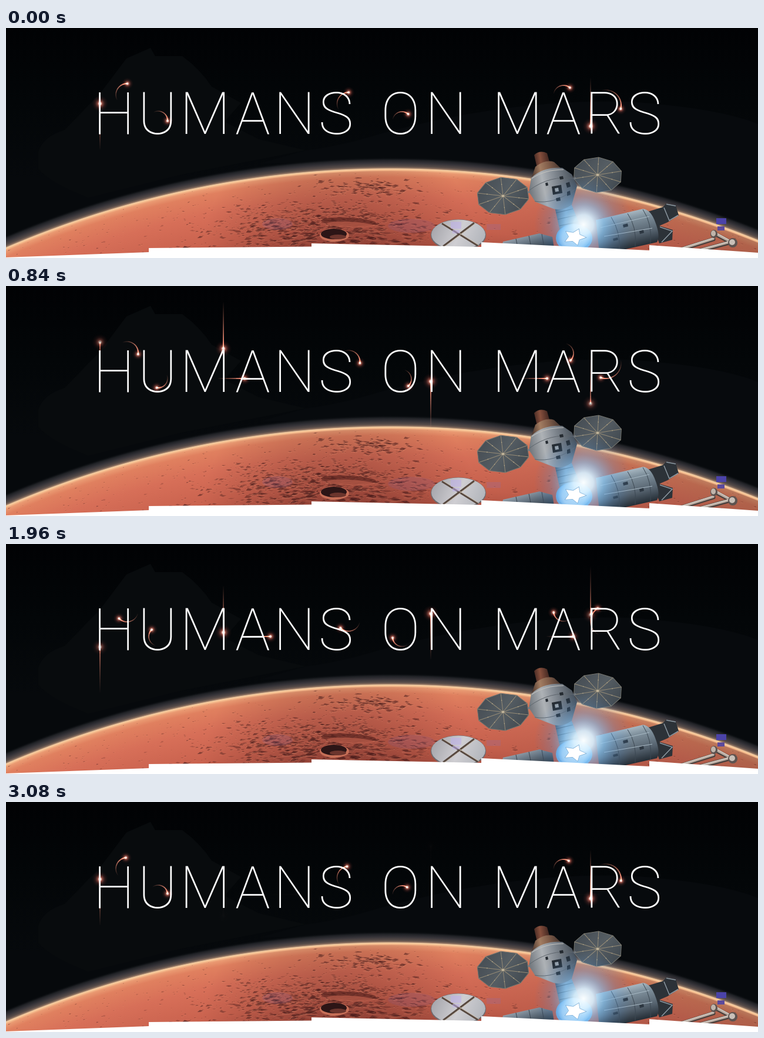
An HTML page with a canvas for the animation above (3150 ms loop, 1280 px wide and 393 px high).

```html
<!DOCTYPE html>
<html lang="en">
<head>
<meta charset="utf-8">
<title>Humans on Mars</title>
<style>
html, body { margin: 0; width: 100%; height: 100%; overflow: hidden; background: #020406; }
canvas { display: block; }
</style>
</head>
<body>
<canvas id="stage" width="1280" height="393"></canvas>
<script>
const W = 1280, H = 393, LOOP = 3150, STEP = 70, TAU = Math.PI * 2;
const ctx = document.getElementById('stage').getContext('2d');
const still = document.createElement('canvas');
still.width = W;
still.height = H;
const bg = still.getContext('2d');

let seed = 11;
const rnd = () => (seed = (seed * 16807) % 2147483647) / 2147483647;
const bell = () => rnd() + rnd() + rnd() + rnd() - 2;

function shade(g, ...stops) {
  stops.forEach(([at, color]) => g.addColorStop(at, color));
  return g;
}
const linear = (x1, y1, x2, y2, ...stops) => shade(bg.createLinearGradient(x1, y1, x2, y2), ...stops);
const radial = (x, y, r1, r2, ...stops) => shade(bg.createRadialGradient(x, y, r1, x, y, r2), ...stops);

function fill(style, d) {
  bg.fillStyle = style;
  bg.fill(new Path2D(d));
}
function line(color, width, d) {
  bg.strokeStyle = color;
  bg.lineWidth = width;
  bg.stroke(new Path2D(d));
}
function oval(style, x, y, rx, ry, turn = 0) {
  bg.fillStyle = style;
  bg.beginPath();
  bg.ellipse(x, y, rx, ry, turn, 0, TAU);
  bg.fill();
}
function wash(style) {
  bg.fillStyle = style;
  bg.fillRect(0, 0, W, H);
}

function drawSky() {
  wash(linear(0, 0, 0, 260, [0, '#010204'], [0.5, '#030608'], [1, '#06090c']));
  fill('#080b0d', 'M55 212Q62 186 100 174L160 112L205 52L246 34L254 48L300 48Q330 70 350 100L400 128L372 160L430 190L510 209L300 250L140 290Q70 262 55 240Z');
  fill('#070a0d', 'M430 232L510 209Q570 202 640 180Q860 120 1060 126Q1210 136 1280 164V345L1000 250L700 225Z');
}

const MARS = { x: 655, y: 1897, r: 1656 };
const limb = x => MARS.y - Math.sqrt(MARS.r ** 2 - (x - MARS.x) ** 2);

// a thin jagged shadow with a lit lower edge
function fleck(x, y, size, alpha) {
  const slope = (x - MARS.x) / MARS.r + bell() * 0.3;
  const flat = size * (0.12 + rnd() * 0.22);
  const d = `M${x - size} ${y - size * slope}L${x - size * rnd() * 0.6} ${y - flat}`
    + `L${x + size * rnd()} ${y - flat * rnd()}L${x + size} ${y + size * slope}L${x} ${y + flat}Z`;
  line(`rgba(255,176,138,${alpha * 0.4})`, 0.8, `M${x - size} ${y + flat + 1}L${x + size} ${y + size * slope + 1}`);
  fill(`rgba(66,24,24,${alpha})`, d);
}

function drawMars() {
  wash(radial(MARS.x, MARS.y, MARS.r - 150, MARS.r + 20,
    [0, '#a34b3c'], [0.3, '#c9624e'], [0.6, '#d76f58'], [0.8, '#e0805f'], [0.855, '#ea9a72'],
    [0.876, '#f8c595'], [0.884, '#f3cda2'], [0.894, '#8f7260'], [0.91, '#5a4e4a'], [0.945, '#363439'],
    [0.975, '#1e2024'], [1, 'rgba(8,11,14,0)']));
  bg.save();
  bg.beginPath();
  bg.arc(MARS.x, MARS.y, MARS.r - 3, 0, TAU);
  bg.clip();
  wash(radial(570, 400, 20, 240, [0, 'rgba(75,25,25,.38)'], [1, 'rgba(75,25,25,0)']));
  wash(linear(760, 0, 1280, 0, [0, 'rgba(60,25,25,0)'], [1, 'rgba(60,25,25,.3)']));
  for (let i = 0; i < 1900; i++) {
    const rough = i < 1050;
    const x = rough ? 535 + bell() * 165 : rnd() * W;
    const y = rough ? 335 + bell() * 36 : limb(x) + rnd() * 140;
    const depth = Math.max(0, Math.min(1, (y - limb(x)) / 130));
    fleck(x, y, 1 + (1 + depth * (rough ? 9 : 4)) * rnd() ** 1.6, 0.2 + rnd() * (rough ? 0.45 : 0.3));
  }
  for (let i = 0; i < 130; i++) fleck(605 + bell() * 80, 273 + bell() * 15, 1 + rnd() * 6, 0.5);
  oval('rgba(80,30,28,.6)', 583, 331, 47, 7, 0.05);
  oval('rgba(178,88,70,.8)', 586, 336, 40, 5, 0.05);
  oval('#c66f57', 559, 354, 25, 11);
  oval('#2c1516', 558, 352, 22, 9);
  oval('#6b352d', 565, 357, 14, 4);
  oval('rgba(125,100,170,.16)', 462, 335, 26, 10);
  oval('rgba(110,85,160,.14)', 690, 338, 40, 12);
  bg.restore();
}

function drawPanel(x, y, rx, ry, turn) {
  const rim = [...Array(10)].map((_, i) => [Math.cos(i * TAU / 10 + 0.3) * rx, Math.sin(i * TAU / 10 + 0.3) * ry]);
  bg.save();
  bg.translate(x, y);
  bg.rotate(turn);
  const edge = 'M' + rim.map(p => p.join(' ')).join('L') + 'Z';
  fill(linear(-rx, -ry, rx, ry, [0, '#424950'], [0.5, '#555d63'], [1, '#3c444b']), edge);
  line('#74756f', 1, edge);
  line('#958b76', 1, rim.map(p => 'M0 0L' + p.join(' ')).join(''));
  for (const [a, b] of rim) oval('#b9ac8c', a * 0.62, b * 0.62, 0.8, 0.8);
  oval('#c0b49a', 0, 0, 2.5, 2);
  bg.restore();
}

function drawShip() {
  // antenna dish
  oval('#6d6b70', 770, 354, 47, 27);
  oval(linear(725, 335, 815, 375, [0, '#a3a3a9'], [0.5, '#cfced2'], [1, '#aeb2b8']), 770, 353, 46, 25.5);
  line('#584940', 3, 'M742 334L803 372M797 333L744 373');
  line('#c5b9a8', 1, 'M744 333L805 371M799 334L746 374');
  fill('rgba(190,175,235,.55)', 'M757 331h18v12h-18zM760 345h12v6h-12z');
  fill('rgba(130,110,190,.2)', 'M818 335h24v10h-24z');

  drawPanel(846, 287, 45, 32, -0.1);
  drawPanel(1007, 251, 42, 30, 0.08);
  line('#777b7e', 3, 'M888 281L900 277M958 262L970 256');

  // lower left module
  fill(linear(880, 350, 890, 382, [0, '#9facb7'], [0.5, '#687683'], [1, '#35404a']), 'M846 365L908 351L930 357L934 382H842Z');
  line('#3a444e', 1, 'M868 360L872 380M890 355L895 380M912 352L917 380');

  // right module
  fill('#2c3238', 'M1092 314L1118 306L1124 300L1140 303L1145 320L1126 332L1112 338L1135 345L1134 362L1112 368Z');
  line('#8d99a2', 1.5, 'M1120 307L1129 329L1144 320M1113 340L1134 347L1116 366M1124 301L1140 304');
  fill(linear(1045, 315, 1060, 378, [0, '#b0c0ca'], [0.25, '#7f909c'], [0.65, '#56636f'], [1, '#222b33']),
    'M1004 328L1084 309Q1098 310 1106 334Q1114 356 1108 366L1028 384H1010Z');
  line('#3c4852', 1, 'M1030 323Q1046 348 1044 379M1058 317Q1074 340 1071 373M1084 310Q1100 334 1097 368');
  line('#a9bac5', 1, 'M1012 341L1095 322M1018 356L1100 342');
  fill('#2d3741', 'M1050 336l8 -2 1 5 -8 2zM1078 347l7 -2 1 5 -7 2zM1033 360l8 -2 1 4 -8 2z');

  // neck
  fill(linear(934, 0, 976, 0, [0, '#465868'], [0.45, '#8ca6bc'], [1, '#4d6276']), 'M934 306L962 300L979 343L944 352Z');
  line('#394a5a', 1.2, 'M936 316L965 309M939 327L970 320M942 338L974 331');

  // capsule
  fill(linear(898, 220, 925, 216, [0, '#442923'], [0.4, '#87503d'], [1, '#3a221e']), 'M899 217Q909 208 921 214L926 232L904 239Z');
  fill(linear(895, 248, 946, 238, [0, '#4e392f'], [0.3, '#a37d62'], [0.6, '#7f5c49'], [1, '#3d302b']), 'M901 237Q919 224 933 229L947 242L894 258Z');
  fill(linear(892, 278, 971, 262, [0, '#73797f'], [0.3, '#aeb2b6'], [0.55, '#858c94'], [1, '#434c55']),
    'M894 256Q914 237 947 239L963 250L972 270L963 302Q948 313 932 309L901 297L890 280Z');
  line('#c3c2be', 1.2, 'M895 257Q917 242 949 242');
  line('#5f666d', 1, 'M891 277Q926 251 968 257M900 296Q932 302 968 276');
  fill('#242a30', 'M929 271l16 -3 2 14 -16 3zM953 265l6 -2 2 8 -6 2zM955 280l5 -2 1 7 -6 2zM942 254l6 -1 1 5 -6 1zM918 265l4 -1 1 5 -4 1zM936 291l7 -2 1 6 -7 1z');
  fill('#9aa3ab', 'M934 274l6 -1 1 6 -6 1z');

  // docking node and flare
  oval('#6faee3', 967, 359, 31, 24);
  oval(radial(967, 357, 4, 28, [0, '#ffffff'], [0.65, '#c4e6ff'], [1, '#6eb4ee']), 967, 357, 28, 22);
  wash(radial(983, 336, 0, 84, [0, 'rgba(250,254,255,1)'], [0.2, 'rgba(215,240,255,.92)'],
    [0.42, 'rgba(130,195,245,.6)'], [0.7, 'rgba(85,150,215,.22)'], [1, 'rgba(60,120,190,0)']));
  let star = '';
  for (let i = 0; i < 10; i++) {
    const a = i * TAU / 10 - 1.2, r = i % 2 ? 10 : 19;
    star += (i ? 'L' : 'M') + (968 + r * Math.cos(a)) + ' ' + (357 + r * 0.75 * Math.sin(a));
  }
  line('#7fb0d8', 1.5, star + 'Z');
  fill('#ffffff', star + 'Z');

  // robot arm
  bg.lineCap = 'round';
  line('#4a403d', 7, 'M1128 385L1204 361M1160 386L1234 366M1205 351L1237 368');
  line('#b9aca2', 4, 'M1128 384L1204 360M1160 385L1234 365M1205 350L1237 367');
  line('#ddd3ca', 1.2, 'M1128 383L1204 359M1160 384L1234 364M1207 349L1238 366');
  bg.lineCap = 'butt';
  oval('#5d5350', 1205, 352, 6, 7);
  oval('#c0b5ab', 1204, 351, 4, 5);
  oval('#5d5350', 1237, 367, 8, 8);
  oval('#c9c0b8', 1236, 366, 5, 5);
  fill('#4b43a8', 'M1209 325h17v10h-17z');
  fill('#5c4a9c', 'M1211 339h12v7h-12z');
}

function drawTitle() {
  const centers = [183.5, 258, 338.5, 420, 490.5, 562, 671.5, 748.5, 870, 949, 1020, 1087];
  bg.font = '100 100px Roboto, sans-serif';
  bg.fillStyle = bg.strokeStyle = '#fff';
  bg.lineJoin = 'round';
  const stem = bg.measureText('I');
  bg.lineWidth = Math.max(0.1, 3.2 - stem.actualBoundingBoxRight - stem.actualBoundingBoxLeft);
  [...'HUMANSONMARS'].forEach((ch, i) => {
    const m = bg.measureText(ch);
    const x = centers[i] - (m.actualBoundingBoxRight - m.actualBoundingBoxLeft) / 2;
    bg.fillText(ch, x, 181);
    bg.strokeText(ch, x, 181);
  });
}

drawSky();
drawMars();
drawShip();
drawTitle();
fill('#fff', 'M0 392L243 383V376L520 373.5V368L809 374V366L1095 380V371L1280 384V393H0Z');

// at(u) gives the head for u = 0 and the end of the tail for u = 1
function comet(at, alpha, size) {
  const parts = 32;
  for (let i = 0; i < parts; i++) {
    const left = 1 - i / parts;
    ctx.strokeStyle = `rgba(250,140,112,${alpha * left ** 0.8})`;
    ctx.lineWidth = 0.8 + 1.4 * left;
    ctx.beginPath();
    ctx.moveTo(...at(i / parts));
    ctx.lineTo(...at((i + 1) / parts));
    ctx.stroke();
  }
  const [x, y] = at(0);
  const glow = shade(ctx.createRadialGradient(x, y, 0, x, y, size),
    [0, '#fff'], [0.14, 'rgba(255,215,200,.95)'], [0.28, 'rgba(225,110,90,.6)'],
    [0.6, 'rgba(130,50,42,.25)'], [1, 'rgba(60,18,15,0)']);
  ctx.globalAlpha = alpha;
  ctx.fillStyle = glow;
  ctx.fillRect(x - size, y - size, size * 2, size * 2);
  ctx.globalAlpha = 1;
}

const TRAVEL = 124, FADE = 700;
// start x, start y, direction x, direction y, tail length, start time
const straight = [
  [160, 198, 0, -1, 78, 1400],
  [370, 74, 0, 1, 79, 0],
  [723, 196, 0, -1, 78, 0],
  [995, 99, 0, 1, 82, 1400],
  [373, 158, 1, 0, 45, 0],
  [888, 158, 1, 0, 45, 0]
];
// center x, center y, radius, start angle in degrees
const orbits = [
  [206, 114, 19, -88],
  [259, 158, 16, 3],
  [583, 129.5, 19.5, -89],
  [674, 159, 16, -48],
  [949, 115, 17, -50],
  [1021, 132, 26, 14]
];

function draw(t) {
  ctx.globalCompositeOperation = 'source-over';
  ctx.drawImage(still, 0, 0);
  ctx.globalCompositeOperation = 'lighter';
  for (const [x, y, dx, dy, tail, start] of straight) {
    const age = (t - start + LOOP) % LOOP;
    const alpha = Math.min(1, age / FADE, (LOOP - age) / FADE) ** 2;
    const gone = TRAVEL * age / LOOP;
    comet(u => [x + dx * (gone - u * tail), y + dy * (gone - u * tail)], alpha, dy ? 14 : 11);
  }
  for (const [x, y, r, start] of orbits) {
    const head = start * TAU / 360 + t / LOOP * TAU;
    comet(u => [x + r * Math.cos(head - u * 2.1), y + r * Math.sin(head - u * 2.1)], 1, 10);
  }
}

let origin;
function tick(now) {
  origin ??= now;
  draw(Math.floor(((now - origin) % LOOP) / STEP) * STEP);
  requestAnimationFrame(tick);
}
draw(0);
requestAnimationFrame(tick);
</script>
</body>
</html>
```
